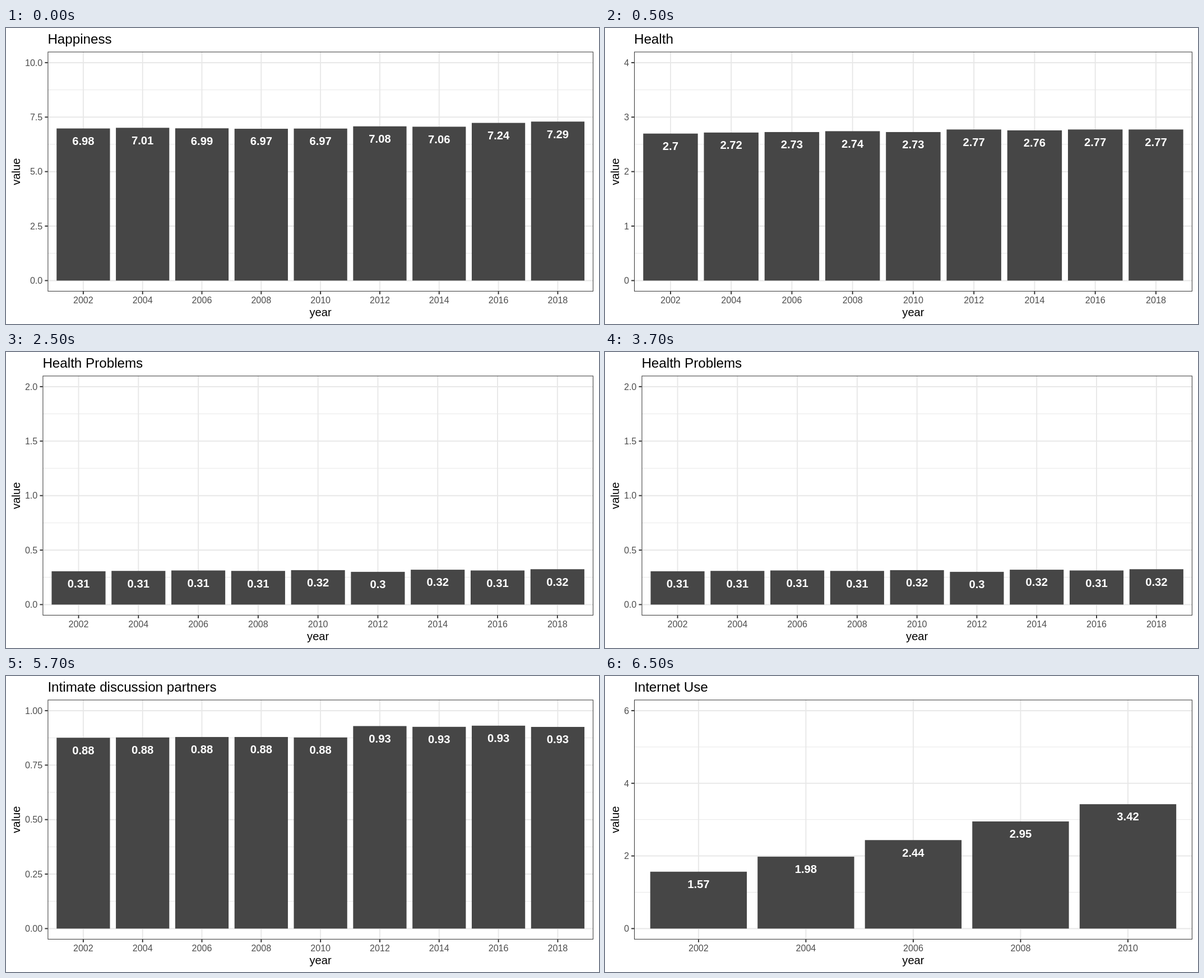
These frames come from a looping animation (1058x529 px, 8000 ms). An HTML page:

```html
<!DOCTYPE html>
<html lang="en">
<head>
<meta charset="utf-8">
<title>Yearly values</title>
<style>
html, body { margin: 0; width: 100%; height: 100%; overflow: hidden; background: #fff; }
#stage { position: relative; width: 1058px; height: 529px; overflow: hidden; }
#strip { animation: flip 8s step-end infinite; }
svg { display: block; font-family: "Liberation Sans", Arial, Helvetica, sans-serif; }
.major { stroke: #e8e8e8; stroke-width: 1.96; }
.minor { stroke: #e8e8e8; stroke-width: 1; }
.tick { stroke: #333; stroke-width: 1.96; }
.border { fill: none; stroke: #333; stroke-width: 1; }
.bar { fill: #464646; }
.title { font-size: 24.2px; }
.name { font-size: 20.17px; text-anchor: middle; }
.axis { font-size: 16.13px; fill: #4d4d4d; text-anchor: middle; }
.axis.end { text-anchor: end; }
.value { font-size: 20.24px; font-weight: bold; fill: #fff; text-anchor: middle; }
@keyframes flip {
  0% { transform: translateY(0); }
  6.25% { transform: translateY(-529px); }
  31.25% { transform: translateY(-1058px); }
  56.25% { transform: translateY(-1587px); }
  81.25%, 100% { transform: translateY(-2116px); }
}
</style>
</head>
<body>
<div id="stage"><div id="strip"></div></div>
<script>
const TOP = 42.4, BOTTOM = 470.9, RIGHT = 1047.9, ZERO = 451.4, SPAN = 389.5;
const DIGIT = 16.13 * 0.556, DOT = 16.13 * 0.278;

const charts = [
  { title: "Happiness", max: 10, steps: 4, digits: 1,
    values: [6.98, 7.01, 6.987, 6.966, 6.975, 7.077, 7.06, 7.235, 7.295] },
  { title: "Health", max: 4, steps: 4, digits: 0,
    values: [2.698, 2.717, 2.726, 2.742, 2.726, 2.773, 2.757, 2.773, 2.773] },
  { title: "Health Problems", max: 2, steps: 4, digits: 1,
    values: [0.3057, 0.309, 0.313, 0.309, 0.316, 0.3005, 0.32, 0.313, 0.3245] },
  { title: "Intimate discussion partners", max: 1, steps: 4, digits: 2,
    values: [0.8756, 0.877, 0.879, 0.879, 0.877, 0.9292, 0.9257, 0.931, 0.9253] },
  { title: "Internet Use", max: 6, steps: 3, digits: 0,
    values: [1.566, 1.98, 2.436, 2.95, 3.424] }
];

const line = (cls, x1, y1, x2, y2) =>
  `<line class="${cls}" x1="${x1}" y1="${y1}" x2="${x2}" y2="${y2}"/>`;
const text = (cls, x, y, str, extra = "") =>
  `<text class="${cls}" x="${x}" y="${y}" ${extra}>${str}</text>`;

function draw({ title, max, steps, digits, values }) {
  // The widest tick label sets the left edge of the panel.
  const widest = max.toFixed(digits).replace(".", "").length;
  const left = 43 + widest * DIGIT + (digits ? DOT : 0);
  const unit = (RIGHT - left) / (values.length + 0.2);
  const middle = (left + RIGHT) / 2;
  let minor = "", major = "", bars = "", labels = "", ticks = "";

  for (let i = 0; i <= steps; i++) {
    const y = ZERO - SPAN * i / steps;
    major += line("major", left, y, RIGHT, y);
    ticks += line("tick", left - 5, y, left, y);
    ticks += text("axis end", left - 9.1, y + 5.8, (max * i / steps).toFixed(digits));
    if (i < steps) {
      const half = y - SPAN / steps / 2;
      minor += line("minor", left, half, RIGHT, half);
    }
  }

  values.forEach((v, i) => {
    const x = left + unit * (i + 0.6);
    const h = SPAN * v / max;
    major += line("major", x, TOP, x, BOTTOM);
    bars += `<rect class="bar" x="${x - unit * 0.45}" y="${ZERO - h}" width="${unit * 0.9}" height="${h}"/>`;
    labels += text("value", x, ZERO - h + 29.3, +v.toFixed(2));
    ticks += line("tick", x, BOTTOM, x, BOTTOM + 5);
    ticks += text("axis", x, 492.2, 2002 + 2 * i);
  });

  const border = `<rect class="border" x="${left + 0.5}" y="${TOP + 0.5}"
    width="${RIGHT - left - 1}" height="${BOTTOM - TOP - 1}"/>`;
  return `<svg width="1058" height="529" viewBox="0 0 1058 529">` +
    minor + major + bars + labels + border + ticks +
    text("title", left, 28, title) +
    text("name", middle, 515.2, "year") +
    text("name", 0, 0, "value", `transform="translate(24.5 256.7) rotate(-90)"`) +
    `</svg>`;
}

document.getElementById("strip").innerHTML = charts.map(draw).join("");
</script>
</body>
</html>
```
